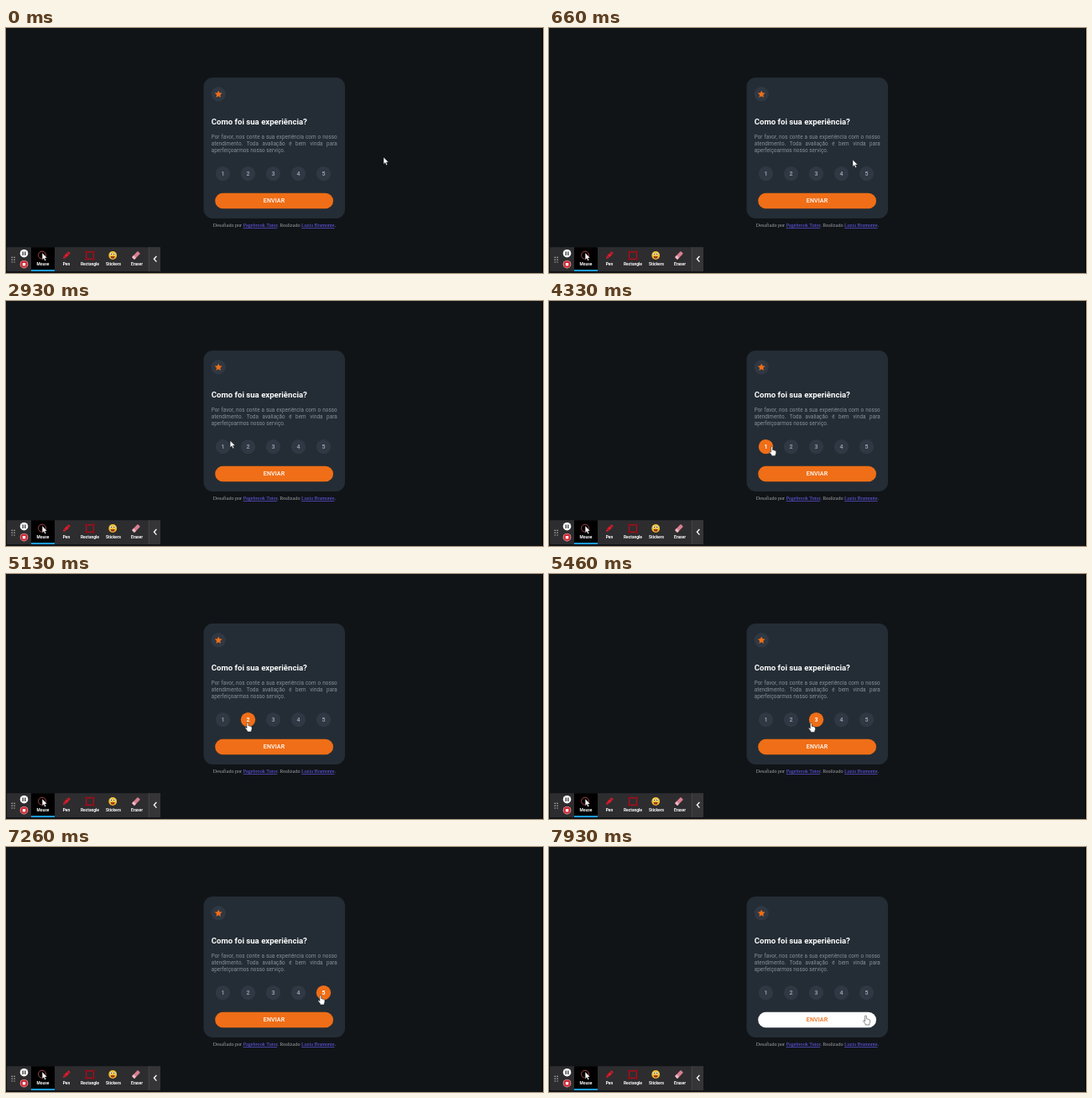
Animation of 640 by 292 pixels, one loop 8000 ms. Source, as an HTML page:

```html
<!DOCTYPE html>
<html lang="pt-BR">
<head>
<meta charset="utf-8">
<title>Avaliação</title>
<style>
html, body { margin: 0; width: 100%; height: 100%; overflow: hidden; background: #111417; }
.stage { position: relative; width: 640px; height: 292px; overflow: hidden; }
svg { position: absolute; inset: 0; display: block; }
svg text { font-family: Roboto, sans-serif; font-weight: 700; }
.copy {
  position: absolute; left: 244.7px; top: 125.6px; width: 150px;
  font: 6.3px/8.4px Roboto, sans-serif; letter-spacing: .05px; color: #87909c;
}
.copy div { white-space: nowrap; text-align-last: justify; }
.copy div:last-child { text-align-last: left; }
.rate circle { fill: #2f3843; }
.rate text { font-size: 7px; fill: #929cab; text-anchor: middle; }
.rate.on circle { fill: #f06e17; }
.rate.on text { fill: #fff; }
.send rect { fill: #f06e17; }
.send text { font-size: 7.1px; font-weight: 500; letter-spacing: .1px; fill: #fff; text-anchor: middle; }
.send.on rect { fill: #fff; }
.send.on text { fill: #f06e17; }
svg .foot { font: 6.1px "Liberation Serif", serif; fill: #a2a4a8; }
.foot .link { fill: #6a60ff; text-decoration: underline; }
.bar text { font-size: 4.9px; fill: #fff; text-anchor: middle; }
</style>
</head>
<body>
<div class="stage">
<svg width="640" height="292" viewBox="0 0 640 292">
  <rect x="639" width="1" height="292"/>
  <rect x="235.5" y="59" width="168.5" height="168" rx="11" fill="#242d35"/>
  <circle cx="253.2" cy="78.8" r="8.7" fill="#2f3843"/>
  <path d="M253.2 74.4l1.3 2.9 3.1.3-2.3 2.1.7 3.1-2.8-1.6-2.8 1.6.7-3.1-2.3-2.1 3.1-.3z" fill="#f06e17"/>
  <text x="244.7" y="114.8" font-size="9.6" fill="#fff">Como foi sua experiência?</text>
  <g id="rates"></g>
  <g class="send" id="send">
    <rect x="249.2" y="196.7" width="140.8" height="18.6" rx="9.3"/>
    <text x="319.5" y="208.2">ENVIAR</text>
  </g>
  <text class="foot" x="246.8" y="237">Desafiado por <tspan class="link">Pagebrook Tutor</tspan>. Realizado <tspan class="link">Luzia Bramonte</tspan>.</text>

  <g class="bar">
    <rect x="1" y="261.3" width="183" height="28.7" rx="1" fill="#2d2d2f"/>
    <rect x="170" y="261.3" width="14" height="28.7" fill="#353537"/>
    <path d="M170.2 261.3V290" stroke="#555" stroke-width=".6"/>
    <path d="M7.2 272.8v7M10 272.8v7" stroke="#c8c8c8" stroke-width="1.3" stroke-dasharray="1.2 1.6"/>
    <circle cx="21.5" cy="268.7" r="4.8" fill="#fff"/>
    <path d="M20.2 266.5v4.4M22.8 266.5v4.4" stroke="#222" stroke-width="1.2"/>
    <circle cx="21.5" cy="281.7" r="4.8" fill="#e8b9bd"/>
    <circle cx="21.5" cy="281.7" r="4.1" fill="#cf2431"/>
    <rect x="19.8" y="280" width="3.4" height="3.4" fill="#fff"/>
    <rect x="30" y="261.3" width="28" height="28.7" fill="#000"/>
    <rect x="30" y="288" width="28" height="2" fill="#1c9be6"/>

    <circle cx="43" cy="270.7" r="4.5" fill="none" stroke="#b04a50" stroke-width=".9"/>
    <path d="M43.2 268v8.2l1.8-1.7 1.3 2.9 1.4-.6-1.3-2.8h2.5z" fill="#fff" stroke="#000" stroke-width=".3"/>
    <g transform="translate(72 271) rotate(45)" fill="#e01b2b">
      <rect x="-1.7" y="-5.2" width="3.4" height="2" rx=".8"/>
      <rect x="-1.7" y="-2.7" width="3.4" height="4.7"/>
      <path d="M-1.7 2.5h3.4L0 5.8z"/>
    </g>
    <rect x="95.6" y="266.8" width="8.8" height="8.6" fill="none" stroke="#b30d1c" stroke-width="1.3"/>
    <path d="M94.3 265.5h2.6v2.6h-2.6zm8.8 0h2.6v2.6h-2.6zm-8.8 8.6h2.6v2.6h-2.6zm8.8 0h2.6v2.6h-2.6z" fill="#8f0c18"/>
    <circle cx="127.2" cy="271" r="4.9" fill="#efbd2c"/>
    <circle cx="125.3" cy="269.4" r="1.3" fill="#fff"/>
    <circle cx="129.1" cy="269.4" r="1.3" fill="#fff"/>
    <circle cx="125.5" cy="269.5" r=".7" fill="#222"/>
    <circle cx="128.9" cy="269.5" r=".7" fill="#222"/>
    <path d="M124.6 272.2h5.2q-.5 2.5-2.6 2.5t-2.6-2.5z" fill="#7a2418"/>
    <path d="M126.3 273.5h1.9v1.2h-1.9z" fill="#e4404c"/>
    <g transform="translate(155 271) rotate(-45)">
      <rect x="-5" y="-2.1" width="10" height="4.2" rx=".9" fill="#d97f90"/>
      <rect x="-5" y="-2.1" width="3" height="4.2" rx=".9" fill="#ecbcc5"/>
    </g>
    <text x="44" y="283.2">Mouse</text>
    <text x="72" y="283.2">Pen</text>
    <text x="100" y="283.2">Rectangle</text>
    <text x="128" y="283.2">Stickers</text>
    <text x="156" y="283.2">Eraser</text>
    <path d="M179.4 272l-3 3.3 3 3.3" fill="none" stroke="#fff" stroke-width="1.3"/>
  </g>
</svg>
<div class="copy">
  <div>Por favor, nos conte a sua experiência com o nosso</div>
  <div>atendimento. Toda avaliação é bem vinda para</div>
  <div>aperfeiçoarmos nosso serviço.</div>
</div>
<svg width="640" height="292" viewBox="0 0 640 292">
  <g id="cursor">
    <path id="arrow" d="M0 0v8.2l1.9-1.8 1.3 3 1.4-.6-1.3-2.9h2.6z" fill="#fff" stroke="#111" stroke-width=".4"/>
    <path id="hand" transform="translate(0 -.9) scale(.93)" d="M-1 .9Q-1-.2 0-.2T1 .9V4l1.2.1.2.3 1.2.1.3.4 1 .2q.6.3.6 1.1v2.2L4.7 10.3v1.4H-.4v-1.2L-2.9 7.2q-.5-.9.2-1.2.6-.2 1.1.4l.6.7z" fill="#fff" stroke="#111" stroke-width=".5"/>
  </g>
</svg>
</div>
<script>
const LOOP = 8000, FPS = 15;
const $ = id => document.getElementById(id);

// Each move: first tick, last tick, end x, end y
const start = [450, 154];
const moves = [
  [0, 5, 439, 155], [7, 10, 362, 157], [15, 19, 322, 157], [22, 26, 292, 156],
  [39, 46, 261, 169], [54, 57, 261.8, 174], [64, 68, 286, 178],
  [76, 82, 312.3, 178.6], [90, 97, 348.5, 176.3], [102, 110, 376, 178],
  [115, 119, 377.5, 202]
];

const ROW = 173.6;
const rates = [1, 2, 3, 4, 5].map(n => {
  const x = 228.5 + n * 30;
  $("rates").insertAdjacentHTML("beforeend",
    `<g class="rate"><circle cx="${x}" cy="${ROW}" r="8.7"/><text x="${x}" y="${ROW + 2.3}">${n}</text></g>`);
  return { x, el: $("rates").lastElementChild };
});

const ease = p => p * p * (3 - 2 * p);

function pointer(tick) {
  let [x, y] = start;
  for (const [from, to, tx, ty] of moves) {
    if (tick <= from) break;
    const p = ease(Math.min(1, (tick - from) / (to - from)));
    x += (tx - x) * p;
    y += (ty - y) * p;
  }
  return [x, y];
}

function draw(now) {
  const tick = Math.floor(((now % LOOP) + 7) * FPS / 1000) % (LOOP * FPS / 1000);
  const [x, y] = pointer(tick);
  let over = x > 249 && x < 390 && y > 196.7 && y < 215.3;
  $("send").classList.toggle("on", over);
  for (const r of rates) {
    const hit = Math.hypot(x - r.x, y - ROW) < 9;
    r.el.classList.toggle("on", hit);
    over = over || hit;
  }
  $("cursor").setAttribute("transform", `translate(${x} ${y})`);
  $("hand").style.display = over ? "" : "none";
  $("arrow").style.display = over ? "none" : "";
}

const origin = performance.now();
function loop() {
  draw(performance.now() - origin);
  requestAnimationFrame(loop);
}
loop();
</script>
</body>
</html>
```
